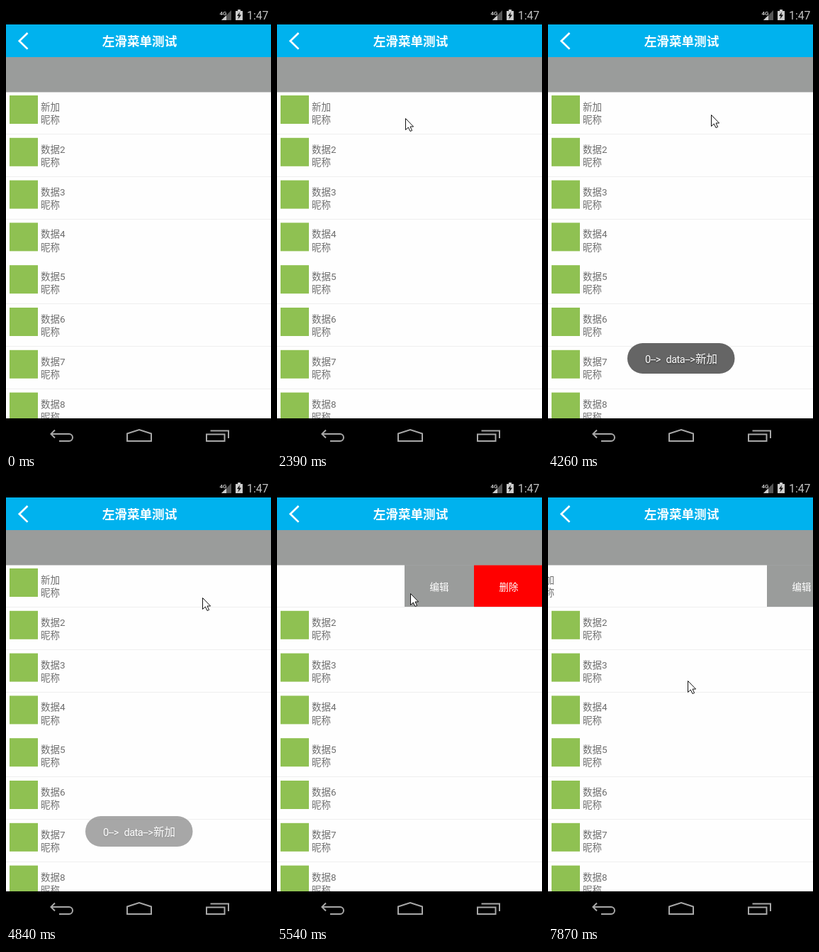
Write an HTML page that moves like this. It is 374 by 627 pixels and loops after 8 s.

```html
<!DOCTYPE html>
<html lang="zh-CN">
<head>
<meta charset="utf-8">
<title>左滑菜单测试</title>
<style>
  html, body { margin: 0; width: 100%; height: 100%; overflow: hidden; background: #000; }
  svg { display: block; width: 374px; height: 627px; }
  text { font-family: Roboto, "Noto Sans CJK SC", "Noto Sans CJK", sans-serif; white-space: pre; }
  .item { font-size: 13.5px; fill: #6e6e6e; }
  .action { font-size: 13.5px; fill: #fff; text-anchor: middle; }
  .divider { fill: #efefef; shape-rendering: crispEdges; }
  .nav { fill: none; stroke: #a8a8a8; stroke-width: 2; }
  #toast text { fill: #fff; font-size: 14.5px; text-shadow: 0 1px 2px #0008; }
  #toast .latin { letter-spacing: -0.5px; }
</style>
</head>
<body>
<svg viewBox="0 0 374 627">
  <defs>
    <clipPath id="listClip"><rect y="121" width="374" height="460"/></clipPath>
    <clipPath id="rowClip"><rect y="121" width="374" height="59"/></clipPath>
  </defs>

  <rect width="374" height="627" fill="#000"/>

  <!-- status bar -->
  <path d="M304 20H318V6Z" fill="#555"/>
  <path d="M304 20H311V13Z" fill="#ccc"/>
  <text x="301.5" y="13" font-size="8" font-weight="500" fill="#ddd" stroke="#000" stroke-width="1.5" paint-order="stroke">4G</text>
  <path d="M324 7H327V5H331V7H334V20H324Z" fill="#ccc"/>
  <path d="M330 8.5L326 14H328.5L327.5 18.5L332 12.5H329.3Z" fill="#111"/>
  <text x="340" y="19.2" font-size="15.8" fill="#c4c4c4">1:47</text>

  <!-- title bar -->
  <rect y="26" width="374" height="46" fill="#00b2ee"/>
  <path d="M30.5 38L18.8 49.3L30.5 60.6" fill="none" stroke="#fff" stroke-width="2.7"/>
  <text x="188.5" y="56" font-size="17.6" font-weight="700" fill="#fff" text-anchor="middle">左滑菜单测试</text>
  <rect y="72" width="374" height="49.5" fill="#9a9c9b"/>

  <g clip-path="url(#listClip)">
    <rect y="121.5" width="374" height="460" fill="#fefefe"/>
    <g id="list"></g>
    <g clip-path="url(#rowClip)">
      <g id="row">
        <rect y="121.5" width="376" height="59" fill="#fefefe"/>
        <rect x="376" y="121.5" width="98" height="59" fill="#9a9c9b"/>
        <rect x="474" y="121.5" width="98" height="59" fill="#f00"/>
        <text class="action" x="425" y="156.5">编辑</text>
        <text class="action" x="523" y="156.5">删除</text>
      </g>
    </g>
  </g>

  <!-- navigation bar -->
  <g class="nav">
    <path d="M69 597.5L63.5 603L69 608.5M63.5 603H89A5 5 0 0 1 89 613H75"/>
    <path d="M171 613V602.5L188 597L205 602.5V613Z"/>
    <path d="M283 603.5H308.5V613H283ZM288.5 598.5H314V609"/>
  </g>

  <g id="toast">
    <rect x="112" y="475" width="151.5" height="43" rx="21.5" fill="#656565"/>
    <text y="502.5"><tspan class="latin" x="137">0--&gt;</tspan><tspan class="latin" x="166.5">data--&gt;</tspan><tspan x="208" font-size="15.5">新加</tspan></text>
  </g>

  <g id="cursor">
    <path d="M.5 .5V16.5L4.3 13L7 18.5L9.6 17.4L7 12H11.6Z" fill="#fff" stroke="#111"/>
  </g>
</svg>
<script>
  const LOOP = 8000, TICK = 130, TOP = 121.3, PITCH = 59.8;
  const el = id => document.getElementById(id);

  function add(parent, tag, attrs, text = "") {
    const node = document.createElementNS("http://www.w3.org/2000/svg", tag);
    for (const key in attrs) node.setAttribute(key, attrs[key]);
    node.textContent = text;
    parent.append(node);
  }

  function addItem(parent, name, y) {
    add(parent, "rect", { x: 5, y: y + 4.7, width: 40, height: 40, fill: "#8fc152" });
    add(parent, "text", { class: "item", x: 49, y: y + 25.7 }, name);
    add(parent, "text", { class: "item", x: 49, y: y + 43.9 }, "昵称");
  }

  addItem(el("row"), "新加", TOP);
  for (let i = 1; i < 8; i++) {
    const y = TOP + i * PITCH;
    addItem(el("list"), "数据" + (i + 1), y);
    // Thinner than a pixel, so a line between pixel centres drops out.
    add(el("list"), "rect", { class: "divider", y: y - 0.9, width: 374, height: 0.85 });
  }

  const linear = p => p;
  const easeIn = p => p * p;
  const easeOut = n => p => 1 - (1 - p) ** n;
  const easeInOut = n => p => p < 0.5 ? (2 * p) ** n / 2 : 1 - (2 - 2 * p) ** n / 2;

  // Each move steps once per tick, from its first visible change to its arrival.
  function play(id, style, state, moves) {
    const frames = [];
    const hold = time => frames.push({ offset: time / LOOP, easing: "step-end", ...style(...state) });
    hold(0);
    for (const { at, until = at, to, ease = linear } of moves) {
      const gaps = Math.round((until - at) / TICK), from = state;
      for (let k = 0; k <= gaps; k++) {
        const p = ease((k + 1) / (gaps + 1));
        state = from.map((v, i) => v + (to[i] - v) * p);
        hold(at + (until - at) * k / (gaps || 1));
      }
    }
    hold(LOOP);
    el(id).animate(frames, { duration: LOOP, iterations: Infinity }).startTime = 0;
  }

  const place = (x, y = 0) => ({ transform: `translate(${Math.round(x)}px, ${Math.round(y)}px)` });
  const fade = opacity => ({ opacity });

  play("cursor", place, [-50, -50], [
    { at: 500, to: [191, 560] },
    { at: 630, until: 780, to: [101, 158], ease: easeOut(3) },
    { at: 2150, until: 2390, to: [181, 158] },
    { at: 3190, until: 3310, to: [227, 152] },
    { at: 4260, until: 4690, to: [277, 167], ease: easeIn },
    { at: 5000, until: 5150, to: [100, 162] },
    { at: 5420, until: 5900, to: [320, 159] },
    { at: 6740, to: [303, 173] },
    { at: 6890, until: 7130, to: [223, 188] },
    { at: 7280, until: 7590, to: [197, 284], ease: easeOut(2) }
  ]);

  play("row", place, [0], [
    { at: 5150, until: 5510, to: [-196], ease: easeInOut(2.8) },
    { at: 7870, to: [-67] }
  ]);

  play("toast", fade, [0], [
    { at: 3070, until: 3550, to: [1], ease: easeOut(1.35) },
    { at: 4840, until: 5270, to: [0], ease: easeOut(2) }
  ]);
</script>
</body>
</html>
```
